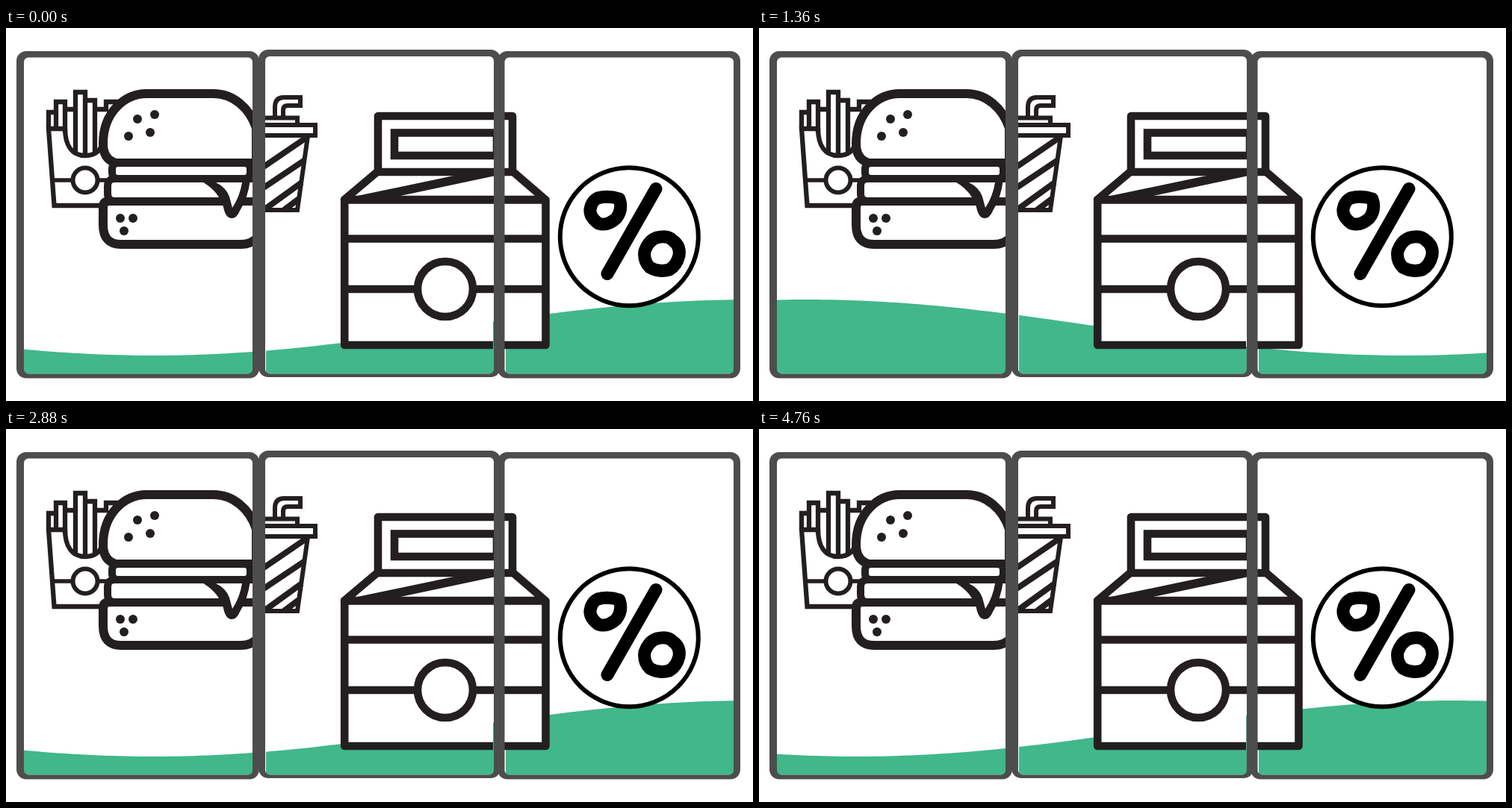
Animation, 1000 px wide and 500 px high, one loop 4.8 s. Source, as an HTML page:

```html
<!DOCTYPE html>
<html lang="en">
<head>
<meta charset="utf-8">
<title>Menu panels</title>
<style>
  html, body { margin: 0; width: 100%; height: 100%; overflow: hidden; background: #fff; }
  svg { display: block; width: 100%; height: 100%; }
  .ink { fill: none; stroke: #231f20; stroke-linejoin: round; }
  .sharp { stroke-linejoin: miter; }
  .dot { fill: #231f20; stroke: none; }
  .paper { fill: #fff; }
</style>
</head>
<body>
<svg viewBox="0 0 1000 500">
  <defs>
    <clipPath id="view"><path d="M24 38H330V463.500H24zM348 38H654V463.500H348zM669 38H974V463.500H669z"/></clipPath>
    <clipPath id="left"><path d="M24 38H331V464H24z"/></clipPath>
    <clipPath id="mid"><path d="M347 38H654V362H652V464H347zM667 38H974V464H667z"/></clipPath>
  </defs>

  <g clip-path="url(#view)"><path id="wave" fill="#41b78b"/></g>

  <!-- fries and burger -->
  <g clip-path="url(#left)">
    <g class="ink sharp" stroke-width="6.300">
      <path d="M80 135H57L64.500 238H135M57 135V113H67M67 135V99H79V140M79 109H93M93 170V86H106V172M106 97H119V170M119 109H134V99H147V150"/>
      <path d="M79 134C79 157 88 171 106 171C120 171 128 163 131 150"/>
      <path d="M62 204H89M123 204H140" stroke-width="5.500"/>
      <circle cx="106" cy="204" r="16.500" stroke-width="6"/>
    </g>
    <g class="ink" stroke-width="12">
      <path class="paper" d="M147 181Q130 176 130 155C130 112 160 88 188 88H278C304 88 326 107 335 134V181z"/>
      <path class="paper" d="M340 232H137Q130 233 130 240V264Q130 290 154 290H314Q330 290 338 279"/>
      <path class="paper" stroke-width="10" d="M340 202H146Q136 202 136 212V222Q136 232 146 232H340"/>
      <rect class="paper" stroke-width="10" x="142" y="181" width="185" height="21" rx="8"/>
    </g>
    <path class="dot" d="M259 204Q284 217 291 240Q294 255 302 255Q309 255 313 245Q324 228 327 203z"/>
    <path class="paper" d="M281 207Q295 214 299 226L303 241Q313 226 316 207z"/>
    <g id="seeds" class="dot"></g>
  </g>

  <!-- drink and carton -->
  <g clip-path="url(#mid)">
    <g class="ink sharp" stroke-width="6">
      <path d="M360 120V106Q360 93 372 93H394V104H377Q371 104 371 110V120"/>
      <path d="M340 120.500H390V130M340 130H414V144H340M404 145L390 244H340"/>
      <path stroke-width="8" d="M345 186L402 147M345 214L400 177M345 244L396 207M372 244L392 229"/>
    </g>
    <g class="ink" stroke-width="10.600">
      <path class="paper" d="M498 192L453 230H722L678 192z"/>
      <rect class="paper" x="498" y="118" width="180" height="75"/>
      <rect class="sharp" x="520" y="140.500" width="137" height="30.500"/>
      <path class="dot" d="M456 228L604 197H660L518 227z"/>
      <rect class="paper" x="453.200" y="230.500" width="269.300" height="194.500"/>
      <path d="M453 282.500H722M453 350H550M626 350H722"/>
      <circle cx="588" cy="350" r="37"/>
    </g>
  </g>

  <!-- discount badge -->
  <g fill="none" stroke="#000" stroke-linecap="round" stroke-linejoin="round">
    <circle class="paper" cx="834.300" cy="279.700" r="92.500" stroke-width="6"/>
    <g stroke-width="17">
      <path d="M870 215.500L805 329.500"/>
      <path d="M792 228Q806 224 821 229Q826 243 817 255Q805 266 793 262Q781 253 782 243Q784 232 792 228z"/>
      <path d="M871 281Q886 277 893 285Q903 292 901 305Q898 318 888 324Q874 328 862 321Q853 312 855 299Q860 285 871 281z"/>
    </g>
  </g>

  <g id="frames" fill="#4d4d4d" fill-rule="evenodd"></g>
</svg>
<script>
  const byId = id => document.getElementById(id);
  const LENGTH = 1600, MEAN = 401.5, AMP = 37.5, TROUGH = 197;

  const roundRect = (l, t, r, b, q) => {
    const arc = (x, y) => `A${q} ${q} 0 0 1 ${x} ${y}`;
    return `M${l + q} ${t}H${r - q}${arc(r, t + q)}V${b - q}${arc(r - q, b)}` +
      `H${l + q}${arc(l, b - q)}V${t + q}${arc(l + q, t)}z`;
  };

  // outer box, then inner box: left, top, right, bottom
  const panels = [
    [[14, 31, 339, 469.5], [24, 39.5, 330, 463.5]],
    [[338, 29, 662, 468], [347, 38, 653, 463.5]],
    [[658, 31, 983, 469.5], [667.5, 39.5, 974, 463.5]]
  ];
  byId('frames').innerHTML = panels.map(([outer, inner]) =>
    `<path d="${roundRect(...outer, 13)}${roundRect(...inner, 6)}"/>`).join('');

  const seeds = [[176, 122], [199, 116], [193, 140], [164, 145], [153, 255], [170, 255], [158, 272]];
  byId('seeds').innerHTML = seeds.map(([x, y]) => `<circle cx="${x}" cy="${y}" r="6"/>`).join('');

  let d = `M${-LENGTH} 500`;
  for (let x = -LENGTH; x <= 1000; x += 10) {
    const y = MEAN + AMP * Math.cos((x - TROUGH) / LENGTH * 2 * Math.PI);
    d += `L${x} ${y.toFixed(2)}`;
  }
  const wave = byId('wave');
  wave.setAttribute('d', d + 'V500z');

  // one wavelength every 960 ms, moved in 40 ms steps
  wave.animate(
    [{ transform: 'translateX(0px)' }, { transform: `translateX(${LENGTH}px)` }],
    { duration: 960, easing: 'steps(24, end)', delay: -2, iterations: Infinity }
  );
</script>
</body>
</html>
```
